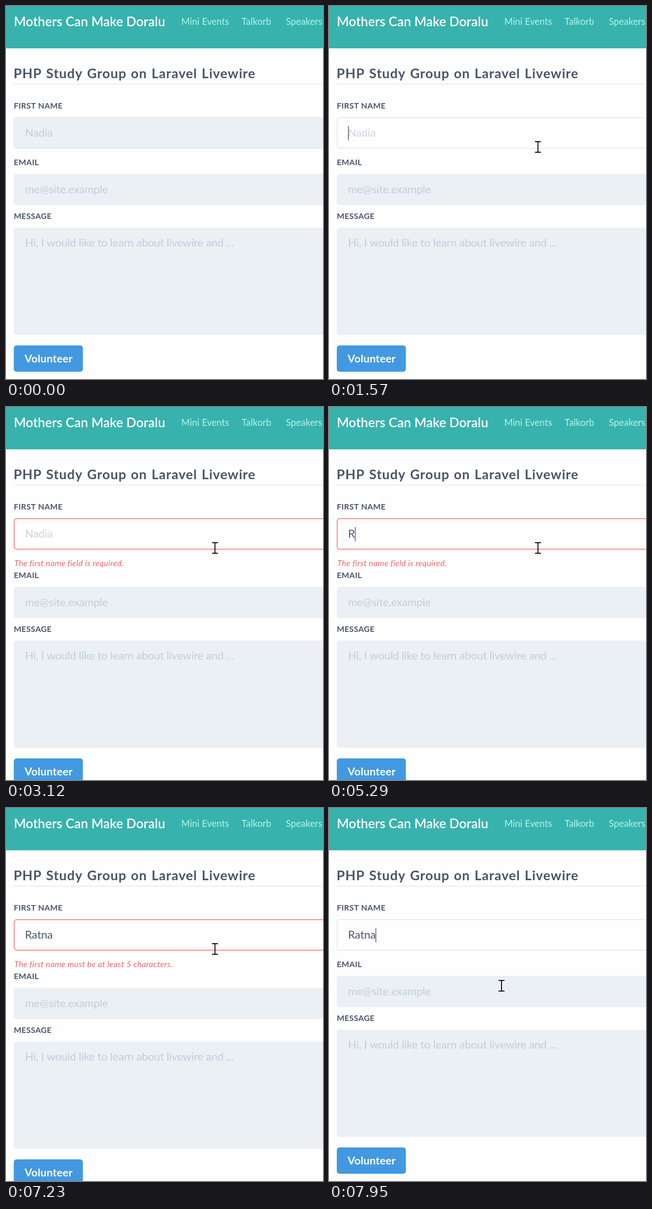
Write an HTML page with a canvas that moves like this. It is 691 by 811 pixels and loops after 8000 ms.

```html
<!DOCTYPE html>
<html lang="en">
<head>
<meta charset="utf-8">
<title>Study group form</title>
<style>
  html, body { margin: 0; width: 100%; height: 100%; overflow: hidden; background: #fefefe; }
  canvas { display: block; }
</style>
</head>
<body>
<canvas id="stage" width="691" height="811"></canvas>
<script>
const ctx = document.getElementById('stage').getContext('2d');
const LOOP = 8000;
const FAMILY = 'Lato, "Open Sans", sans-serif';
const INK = '#4a5568', FILL = '#ebf0f5', LINE = '#dfe5ee', RED = '#f56565', HINT = '#c3ccdb';

// Each row: start time, value held until the next row.
const TYPED = [[0, ''], [2410, 'R'], [2810, ''], [5290, 'R'], [6540, 'Ra'],
  [6690, 'Rat'], [6780, 'Ratn'], [6930, 'Ratna']];
const CARET = [[0, false], [1490, true], [1950, false], [2410, true], [3040, false],
  [3510, true], [4060, false], [4610, true], [5150, false], [5290, true], [5670, false],
  [6170, true], [7230, false], [7710, true]];
const ERROR = [[0, ''], [3120, 'The first name field is required.'],
  [5530, 'The first name must be at least 5 characters.'], [7550, '']];

// Pointer moves: start, end, steps, from, to.
const MOVES = [
  [200, 320, 3, [676, 890], [579.5, 613.5]],
  [640, 1010, 6, [579.5, 613.5], [455.5, 306.5]],
  [7630, 7950, 5, [455.5, 306.5], [376, 386.5]]
];

function held(rows, t) {
  let value = rows[0][1];
  for (const [start, v] of rows) if (t >= start) value = v;
  return value;
}

function pointerAt(t) {
  let pos = null;
  for (const [start, end, steps, from, to] of MOVES) {
    if (t < start) break;
    const step = Math.floor((t - start) / (end - start) * (steps - 1) + 1e-6) + 1;
    const p = Math.min(1, step / steps);
    const k = Math.sin(p * Math.PI / 2);
    pos = from.map((a, i) => a + (to[i] - a) * k);
  }
  return pos;
}

function text(str, x, y, font, color, spacing = 0, words = 0) {
  ctx.font = `${font} ${FAMILY}`;
  ctx.letterSpacing = spacing + 'px';
  ctx.wordSpacing = words + 'px';
  ctx.fillStyle = color;
  ctx.fillText(str, x, y);
  return ctx.measureText(str).width;
}

function box(x, y, w, h, fill, border) {
  ctx.beginPath();
  ctx.roundRect(x, y, w, h, 6);
  ctx.fillStyle = fill;
  ctx.fill();
  if (!border) return;
  ctx.beginPath();
  ctx.roundRect(x + 0.75, y + 0.75, w - 1.5, h - 1.5, 5.25);
  ctx.strokeStyle = border;
  ctx.lineWidth = 1.5;
  ctx.stroke();
}

const label = (str, y) => text(str, 17, y, '700 17.4px', INK, 0.42);
const hint = (str, y, color = HINT) => text(str, 41.5, y, '24px', color, -0.2);

function header() {
  ctx.fillStyle = '#38b2ac';
  ctx.fillRect(0, 0, 691, 92);
  text('Mothers Can Make Doralu', 17, 44, '600 28.3px', '#fff');
  [['Mini Events', 382], ['Talkorb', 513.5], ['Speakers', 610]]
    .forEach(([str, x]) => text(str, x, 41, '20.3px', '#b2f5ea'));
  text('PHP Study Group on Laravel Livewire', 16.5, 157, '700 29px', INK, 1.05, 1.6);
  ctx.fillStyle = LINE;
  ctx.fillRect(17, 169, 674, 1.4);
}

function nameField(t, error) {
  const typed = held(TYPED, t), focused = t >= 1490;
  label('FIRST NAME', 223);
  box(17, 242, 700, 68, focused ? '#fefefe' : FILL, error ? RED : LINE);
  let width = 0;
  if (typed) width = text(typed, 41.5, 284, '24px', INK);
  else hint('Nadia', 284, focused ? '#cdd3de' : HINT);
  if (held(CARET, t)) {
    ctx.fillStyle = INK;
    ctx.fillRect(Math.round(41.5 + width) - 0.5, 261, 1.5, 31);
  }
  if (error) text(error, 18, 346, 'italic 18px', RED, 0.3);
}

function lowerForm(shift) {
  ctx.save();
  ctx.translate(0, shift);
  label('EMAIL', 346);
  box(17, 365, 700, 68, FILL);
  hint('me@site.example', 407);
  label('MESSAGE', 463);
  box(17, 482, 700, 233, FILL);
  hint('Hi, I would like to learn about livewire and ...', 523);
  box(17, 738, 150.6, 57.3, '#4299e1');
  text('Volunteer', 40.5, 775, '700 23.7px', '#fff', 0.15);
  ctx.restore();
}

function beam(x, y) {
  ctx.beginPath();
  for (const end of [y - 11.5, y + 11.5]) {
    ctx.moveTo(x - 6.5, end);
    ctx.lineTo(x + 6.5, end);
  }
  ctx.moveTo(x, y - 11.5);
  ctx.lineTo(x, y + 11.5);
  ctx.strokeStyle = '#000';
  ctx.lineWidth = 2;
  ctx.stroke();
}

function arrow(x, y) {
  ctx.beginPath();
  [[0, 0], [0, 23], [5, 18], [9, 26], [13, 24], [9, 16], [16, 16]]
    .forEach(([dx, dy]) => ctx.lineTo(x + dx, y + dy));
  ctx.closePath();
  ctx.fillStyle = '#fff';
  ctx.fill();
  ctx.strokeStyle = '#000';
  ctx.lineWidth = 1.3;
  ctx.stroke();
}

function pointer(t) {
  const pos = pointerAt(t);
  if (pos) (pos[1] > 715 ? arrow : beam)(...pos);
  if (t >= 1330 && t < 1570) {
    ctx.beginPath();
    ctx.arc(453, 305.5, 17.3, 0, Math.PI * 2);
    ctx.fillStyle = 'rgba(255,255,20,.48)';
    ctx.fill();
  }
}

function draw(t) {
  const error = held(ERROR, t);
  ctx.fillStyle = '#fefefe';
  ctx.fillRect(0, 0, 691, 811);
  header();
  nameField(t, error);
  lowerForm(error ? 26 : 0);
  pointer(t);
}

const begin = performance.now();
function tick() {
  draw((performance.now() - begin) % LOOP);
  requestAnimationFrame(tick);
}
tick();
</script>
</body>
</html>
```
